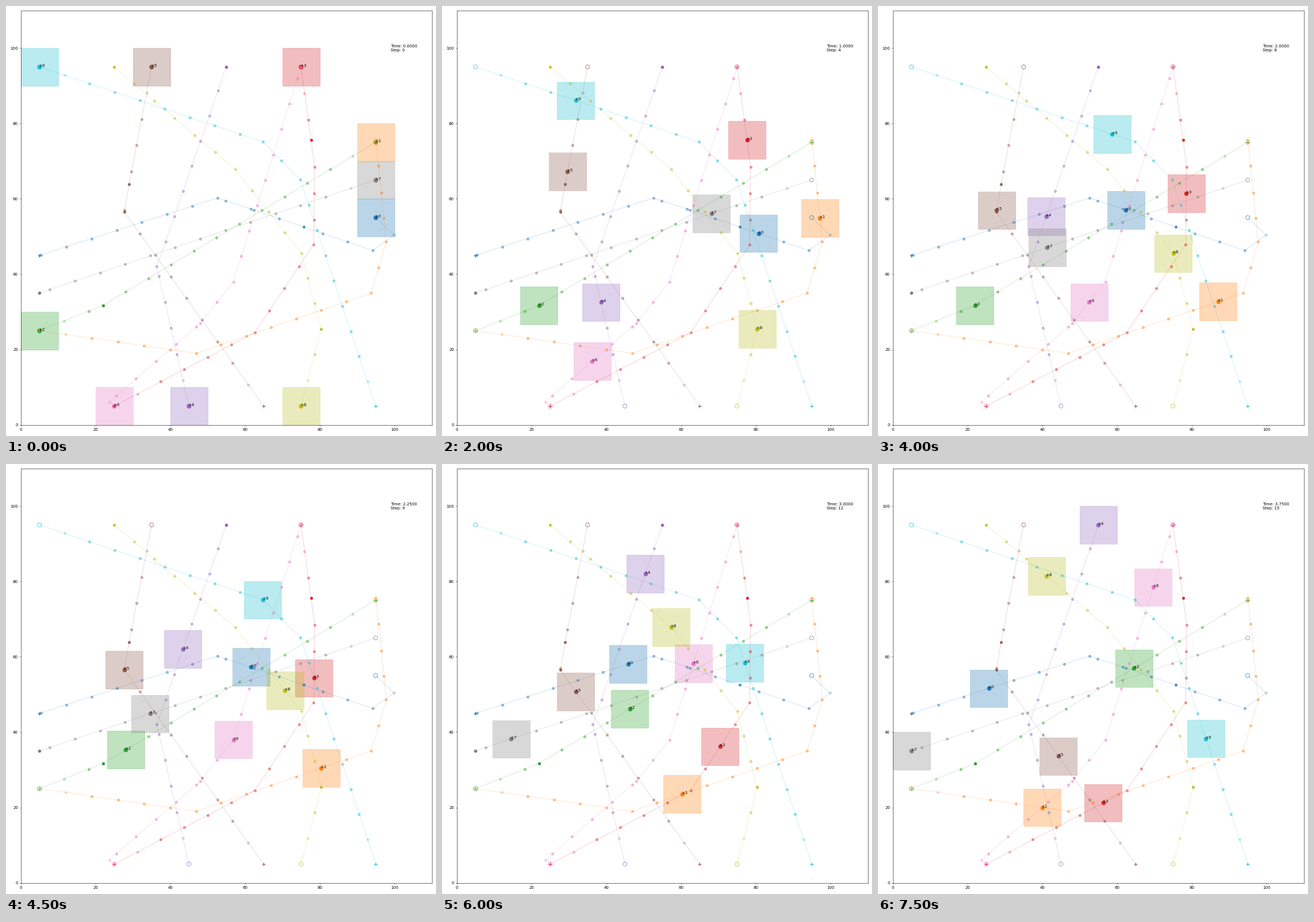
Animation, 748 px wide and 748 px high, one loop 8000 ms. Source, as a matplotlib script:

```python
import math

import matplotlib.pyplot as plt
import numpy as np
from matplotlib.animation import FuncAnimation
from matplotlib.patches import Rectangle

STAGE, DPI = 748, 50
LEFT, RIGHT, TOP, BOTTOM = 25.8, 740.6, 7.5, 728.7
STEPS, INTERVAL, DT = 16, 500, 0.25
HORIZON = 20
SPEED = math.sqrt(50)
AREA, CELL = 100, 10

# Every robot starts in a border cell and heads for the opposite one.
CELLS = [(9, 5), (9, 7), (0, 2), (7, 9), (4, 0),
         (3, 9), (2, 0), (9, 6), (7, 0), (0, 9)]

# Points where a robot turns to avoid others; a bare integer waits.
DETOURS = {
    0: [(99.9, 50.4), (94.2, 46.3), (75.8, 52.5), 1, (61.6, 57.3), (52.6, 60.2)],
    1: [(95, 75.7), (97.2, 54.9), (97.8, 48.6), (93.8, 35), (47, 19)],
    2: [(22, 31.7), 5],
    3: [(77.7, 75.6), 3, (78.6, 68.5), (78.4, 47.9), (62.6, 24.5)],
    4: [(36.4, 42)],
    5: [(29, 63.9), 2, (27.7, 56.5), 2],
    6: [(23.7, 6.1), (25.5, 7.7), (48.1, 27), (56.9, 38)],
    8: [(80.4, 25.4), 2, (75.1, 45.5), (57.4, 67.8)],
    9: [(64.8, 75.1), (74.8, 65.1)],
}


def walk(start, detours):
    """Position at every step, moving at top speed from turn to turn."""
    path = [start]
    for stop in [*detours, AREA - start]:
        here = path[-1]
        if isinstance(stop, int):
            path += [here] * stop
            continue
        leg = np.subtract(stop, here)
        dist = math.hypot(*leg)
        count = max(1, math.ceil(dist / SPEED - 0.05))
        path += [here + leg * min(1, k * SPEED / dist) for k in range(1, count)]
        path.append(here + leg)
    path += [path[-1]] * (HORIZON + 1 - len(path))
    return np.array(path[:HORIZON + 1])


starts = (np.array(CELLS) + 0.5) * CELL
paths = [walk(start, DETOURS.get(i, [])) for i, start in enumerate(starts)]

fig = plt.figure(figsize=(STAGE / DPI, STAGE / DPI), dpi=DPI)
ax = fig.add_axes([LEFT / STAGE, 1 - BOTTOM / STAGE,
                   (RIGHT - LEFT) / STAGE, (BOTTOM - TOP) / STAGE])
ticks = range(0, AREA + 1, 20)
ax.set(xlim=(0, 110), ylim=(0, 110), xticks=ticks, yticks=ticks)

robots = []
for i, start in enumerate(starts):
    color = f"C{i}"
    box = ax.add_patch(Rectangle(start - CELL / 2, CELL, CELL,
                                 color=color, alpha=0.3))
    dot = ax.scatter(*start, s=100, color=color)
    label = ax.text(*start, f"r-{i}")
    robots.append((box, dot, label))

for i, path in enumerate(paths):
    color = f"C{i}"
    ax.plot(*path.T, color=color, alpha=0.2)
    for part in (path[1:-2], path[2:-1]):
        ax.scatter(*part.T, color=color, alpha=0.25)
    ax.scatter(*path[0], s=100, facecolors="none", edgecolors=color)
    ax.scatter(*path[-1], s=100, marker="+", color=color)

clock = ax.text(0.9, 0.901, "", transform=ax.transAxes)


def update(step):
    for (box, dot, label), path in zip(robots, paths):
        pos = path[step]
        box.set_xy(pos - CELL / 2)
        dot.set_offsets([pos])
        label.set_position(pos)
    clock.set_text(f"Time: {step * DT:.4f}\nStep: {step}")


anim = FuncAnimation(fig, update, frames=STEPS, interval=INTERVAL, repeat=True)
plt.show()
```
